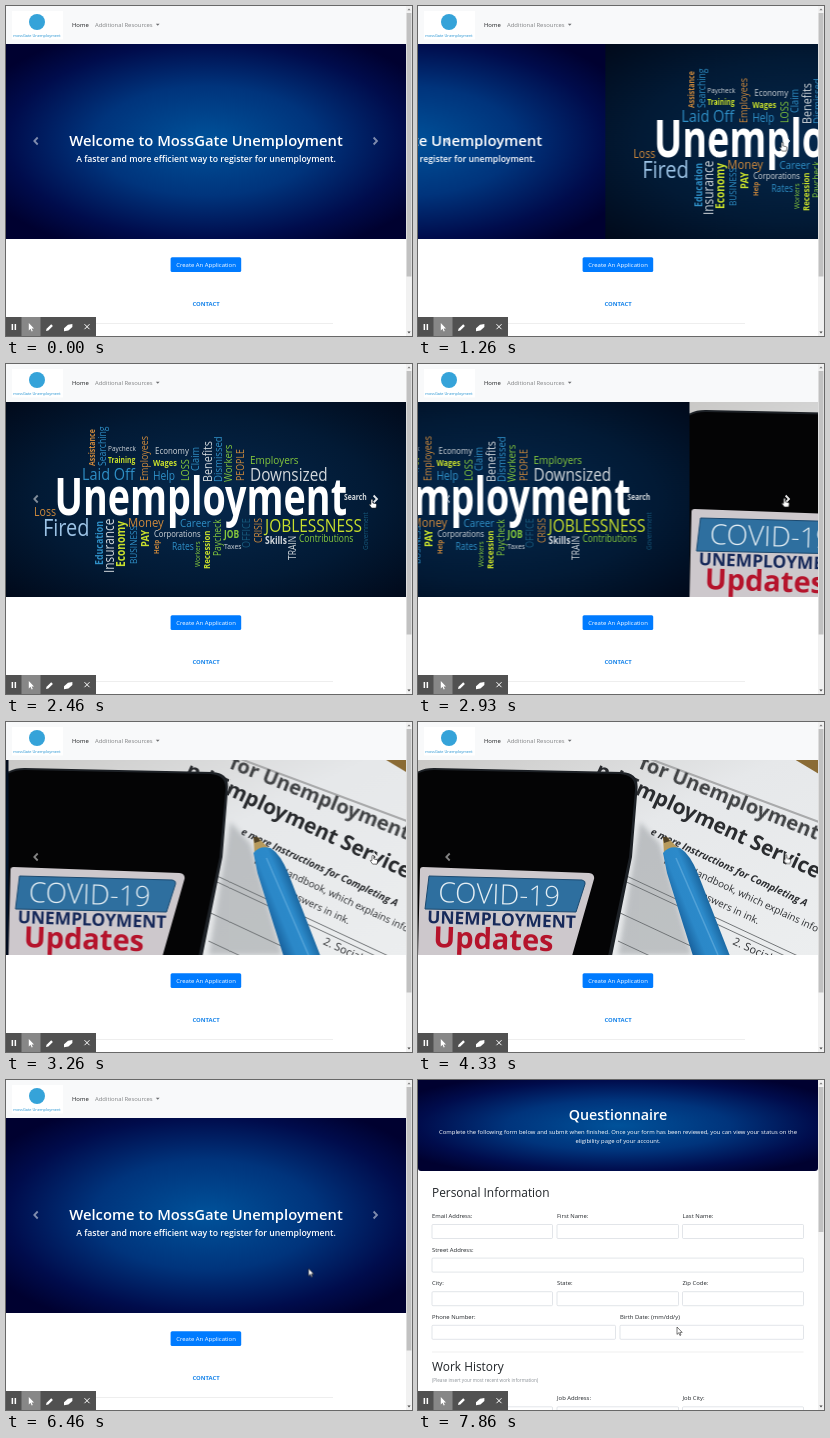
Write an HTML page that moves like this. It is 406 px wide and 330 px high and loops after 7930 ms.

```html
<!DOCTYPE html>
<html lang="en">
<head>
<meta charset="utf-8">
<title>Unemployment registration</title>
<style>
  html, body { margin: 0; width: 100%; height: 100%; overflow: hidden; background: #fff; }
  svg { display: block; }
  text { font-family: "Open Sans", "Noto Sans", sans-serif; white-space: pre; }
</style>
</head>
<body>
<svg id="stage" width="406" height="330" viewBox="0 0 406 330"></svg>
<script>
const LOOP = 7930;
const CONDENSED = 0.85;

const text = (x, y, size, str, fill = '#212529', extra = '') =>
  `<text x="${x}" y="${y}" font-size="${size}" fill="${fill}" ${extra}>${str}</text>`;
const turned = (x, y, angle, size, str, fill, extra = '') =>
  `<text transform="translate(${x} ${y}) rotate(${angle})" font-size="${size}" fill="${fill}" ${extra}>${str}</text>`;
const rect = (x, y, w, h, fill, extra = '') =>
  `<rect x="${x}" y="${y}" width="${w}" height="${h}" fill="${fill}" ${extra}/>`;
const path = (d, fill, extra = '') => `<path d="${d}" fill="${fill}" ${extra}/>`;
const MID = 'text-anchor="middle"';
const SEMI = 'font-weight="600"';
const BOLD = 'font-weight="700"';

const defs = `<defs>
  <radialGradient id="blue" r=".62">
    <stop offset="0" stop-color="#00529a"/><stop offset=".45" stop-color="#00347c"/>
    <stop offset=".8" stop-color="#000c4c"/><stop offset="1" stop-color="#000130"/>
  </radialGradient>
  <radialGradient id="night" r=".7">
    <stop offset="0" stop-color="#06294d"/><stop offset=".6" stop-color="#021a35"/>
    <stop offset="1" stop-color="#010a1b"/>
  </radialGradient>
  <linearGradient id="paper" x2="1" y2="1">
    <stop offset="0" stop-color="#c9c8c6"/><stop offset=".45" stop-color="#e6e8ea"/>
    <stop offset="1" stop-color="#eceeef"/>
  </linearGradient>
  <linearGradient id="pen" gradientUnits="userSpaceOnUse" x1="257" y1="190" x2="296" y2="174">
    <stop offset="0" stop-color="#17609c"/><stop offset=".3" stop-color="#2b88c8"/>
    <stop offset=".6" stop-color="#2c8aca"/><stop offset="1" stop-color="#0f4f84"/>
  </linearGradient>
  <filter id="soft"><feGaussianBlur stdDeviation="2.5"/></filter>
  <filter id="hazy"><feGaussianBlur stdDeviation=".6"/></filter>
</defs>`;

// Slides, each drawn in stage coordinates
const welcome = rect(0, 37, 400.5, 196, 'url(#blue)') +
  text(200, 140, 14.8, 'Welcome to MossGate Unemployment', '#fff', MID + SEMI) +
  text(200, 156, 8.7, 'A faster and more efficient way to register for unemployment.', '#fff', MID + SEMI);

const INK = {
  w: '#d3d8dc', b: '#2f8fc6', o: '#cf8a3c', y: '#c9e02c', g: '#86c93c', s: '#9cc3e6', d: '#17597c'
};
// text, x, baseline, size, ink; a capital ink letter means bold
const across = [
  ['Paycheck', 102, 87, 7.6, 'w'], ['Training', 102, 99, 7.9, 'Y'], ['Laid Off', 76, 116, 17, 'b'],
  ['Wages', 147, 102, 8.8, 'Y'], ['Economy', 149, 89.5, 9.3, 'w'], ['Help', 147, 116, 12, 'b'],
  ['Employers', 244, 100, 11.7, 'g'], ['Downsized', 244, 117, 18, 'w'], ['Search', 338, 136, 8, 'W'],
  ['Loss', 28, 152, 12.5, 'o'], ['Fired', 37, 172, 23.5, 's'], ['Money', 122, 163, 13.3, 'o'],
  ['Career', 174, 163, 11.7, 'b'], ['Corporations', 148, 173, 9, 'w'], ['Rates', 166, 186, 10, 'b'],
  ['JOB', 218, 174, 9.9, 'G'], ['Taxes', 218, 185, 8, 'w'], ['JOBLESSNESS', 259, 168, 18.2, 'y'],
  ['Skills', 259, 180, 10, 'W'], ['Contributions', 293, 178, 10, 'g']
];
const upward = [
  ['Assistance', 89, 102, 8.2, 'O'], ['Searching', 100, 102, 10.2, 'b'], ['Employees', 142, 117, 10.5, 'o'],
  ['LOSS', 183, 117, 10.8, 'g'], ['Claim', 193, 107, 10.8, 'b'], ['Benefits', 206, 118, 12.7, 'w'],
  ['Dismissed', 216, 118, 11.3, 'b'], ['Workers', 226, 118, 11.4, 'g'], ['PEOPLE', 238, 117, 10.4, 'o'],
  ['Education', 97, 201, 10.4, 'B'], ['Insurance', 108, 209, 14, 'w'], ['Economy', 119, 203, 12, 'Y'],
  ['BUSINESS', 131, 200, 9.7, 'b'], ['PAY', 143, 183, 11, 'Y'], ['Help', 153, 190, 7.2, 'O'],
  ['Workers', 194, 203, 7.8, 'g'], ['Recession', 204, 205, 9.2, 'Y'], ['Paycheck', 215, 192, 10, 'g'],
  ['OFFICE', 244, 184, 10.7, 'd'], ['CRISIS', 256, 179, 10.1, 'o'], ['TRAIN', 290, 196, 10, 'w'],
  ['Government', 362, 186, 7.6, 'd']
];
const word = angle => ([str, x, y, size, ink]) => {
  const key = ink.toLowerCase();
  return `<text transform="translate(${x} ${y}) rotate(${angle}) scale(${CONDENSED} 1)" font-size="${size}"
    fill="${INK[key]}" font-weight="${ink === key ? 400 : 700}">${str}</text>`;
};
const cloud = rect(0, 37, 400.5, 196, 'url(#night)') +
  across.map(word(0)).join('') + upward.map(word(-90)).join('') +
  `<text transform="translate(48.5 150.5) scale(.72 1)" font-size="52.4" fill="#fff" ${BOLD}>Unemployment</text>`;

const TILT = 25;
const form = [
  ['e more Instructions for Completing A', 232, 112, 'font-style="italic" font-weight="700"'],
  ['page. Handbook, which explains info', 246, 139, ''],
  ['Write answers in ink.', 253, 162, '']
].map(([str, x, y, extra]) => turned(x, y, TILT, 9.9, str, '#2b2d30', extra)).join('');
const rules = [150, 156, 190, 219].map(y =>
  path(`M200 ${y}L410 ${y + 98}`, 'none', 'stroke="#55585b" stroke-width=".8"')).join('');

const photo = rect(0, 37, 400.5, 196, 'url(#paper)') +
  path('M376 37H401V52Z', '#8a6b35', 'filter="url(#hazy)"') +
  path('M232 37L401 100', 'none', 'stroke="#a9aaab" stroke-width="2" filter="url(#hazy)"') +
  turned(220, 46, 22, 20.3, 'for Unemployment', '#404244', BOLD + ' filter="url(#hazy)"') +
  turned(176, 53, TILT, 21, 'nd Employment Service', '#2a2c2f', BOLD) +
  rules + form +
  turned(314, 222, TILT, 11, '2. Social Security', '#2b2d30') +
  path('M222 100L242 122L274 233H200Z', '#6d7277', 'opacity=".35" filter="url(#soft)"') +
  // phone
  path('M-1 50Q6 46 16 46L204 50Q221 51 219.5 67L214 135L194 234H-1Z', '#1d2126') +
  path('M-1 52Q6 48 16 48L202 52Q218 53 217 68L211 135L190 234H-1Z', '#040405') +
  path('M5 145L171 151Q177 152 176 157L154 234H0L2 148Q2 145 5 145Z', '#cdc8cc') +
  path('M11 154L164 158Q168 159 167 162L158 190L7 187Z', '#2e6f9f', 'stroke="#1c4a70"') +
  turned(20, 180, 2, 28, 'COVID-19', '#e3edf3', 'font-weight="300"') +
  turned(9, 201, 2, 17.4, 'UNEMPLOYMENT', '#16295a', BOLD) +
  turned(15, 225, 2, 29, 'Updates', '#b5142c', BOLD) +
  // pen
  path('M245 115L249 115L261 127L246 133Z', '#b79a5c') +
  path('M245 115L249 115L252 119L246 121Z', '#4f4126') +
  path('M245 131Q251 123 262 126Q272 132 280 152L312 234H275L249 151Z', 'url(#pen)') +
  path('M258 136L300 233', 'none', 'stroke="#7dbde6" stroke-width="1.6" opacity=".45"');

const slides = [welcome, cloud, photo, welcome]
  .map((s, i) => `<svg x="${i * 400}" y="37" width="400.5" height="196" viewBox="0 37 400.5 196">${s}</svg>`).join('');

const chevron = (id, x, dir) =>
  path(`M${x - 1.7 * dir} 131.5l${3.4 * dir} 3.5l${-3.4 * dir} 3.5`, 'none',
    `id="${id}" stroke="#fff" stroke-width="1.8" opacity=".5"`);

const scrollbar = thumb => rect(400, 0, 6, 330, '#f1f1f1') + rect(400.6, 7, 4.8, thumb, '#c1c1c1') +
  path('M401.4 4.2L403 2.4L404.6 4.2Z', '#777') + path('M401.4 325.6L403 327.4L404.6 325.6Z', '#444');

const home = rect(0, 0, 406, 330, '#fff') + rect(0, 0, 400, 38, '#f8f9fa') +
  rect(6, 5, 51, 28.5, '#fff') + '<circle cx="31" cy="16" r="8" fill="#35a3d9"/>' +
  text(31, 30.5, 3.9, 'mossGate Unemployment', '#1d8fd0', MID) +
  text(66, 21, 5.9, 'Home', '#1b1d1f') + text(89, 21, 5.9, 'Additional Resources', '#808284') +
  path('M149.8 17.8h3.8l-1.9 2z', '#6c6e70') +
  `<svg x="0" y="38" width="400" height="195" viewBox="0 38 400 195"><g id="strip">${slides}</g></svg>` +
  chevron('prev', 30, -1) + chevron('next', 369.3, 1) +
  rect(164.6, 251.2, 70.6, 14.8, '#007bff', 'rx="1.6" id="button"') +
  text(200, 260.8, 5.95, 'Create An Application', '#fff', MID) +
  text(200, 300.3, 5.9, 'CONTACT', '#1583ea', MID + BOLD) +
  rect(73, 317.2, 254, .6, '#e3e3e3') + scrollbar(263.5);

// Questionnaire: label, x, label baseline, box width
const fields = [
  ['Email Address:', 14, 138, 120.5], ['First Name:', 139, 138, 121.5], ['Last Name:', 264.5, 138, 121],
  ['Street Address:', 14, 171.6, 371.5],
  ['City:', 14, 205.2, 120.5], ['State:', 139, 205.2, 121.5], ['Zip Code:', 264.5, 205.2, 121],
  ['Phone Number:', 14, 238.8, 183.5], ['Birth Date: (mm/dd/y)', 202, 238.8, 183.5],
  ['Job Title:', 14, 320.3, 120.5], ['Job Address:', 139, 320.3, 121.5], ['Job City:', 264.5, 320.3, 121]
].map(([label, x, y, w]) => text(x, y, 5.9, label) +
  rect(x, y + 6.5, w, 14, '#fff', 'rx="1" stroke="#ced4da" stroke-width=".6"')).join('');

const questionnaire = rect(0, 0, 406, 330, '#fff') +
  path('M0 0H400V88Q400 91 397 91H3Q0 91 0 88Z', 'url(#blue)') +
  text(200, 40, 14.3, 'Questionnaire', '#fff', MID + SEMI) +
  text(200, 53.6, 5.9, 'Complete the following form below and submit when finished. Once your form has been reviewed, you can view your status on the', '#fff', MID) +
  text(200, 63.2, 5.9, 'eligibility page of your account.', '#fff', MID) +
  text(14, 117, 11.9, 'Personal Information', '#212529', 'font-weight="500"') +
  fields + rect(14, 271.7, 371.5, .6, '#e3e3e3') +
  text(14, 291, 11.9, 'Work History', '#212529', 'font-weight="500"') +
  text(14, 302, 4.6, '(Please insert your most recent work information)', '#8a9096') + scrollbar(145);

const ARROW = 'M0 0V7.4L1.7 5.8L2.9 8.5L4 8L2.8 5.4H5.2Z';
const HAND = 'M-1 1.2a.9.9 0 0 1 1.8 0V4l3 .7q1 .3.8 1.4l-.6 3H-.3L-2.8 5.7q.7-1.2 1.8-.1z';
const OUTLINE = 'stroke="#222" stroke-width=".6"';

const toolbar = rect(0, 311, 90, 19, '#515151') + rect(15.5, 311, 19, 19, '#878787') +
  rect(5.6, 318, 1.5, 6, '#fff') + rect(8.6, 318, 1.5, 6, '#fff') +
  path(ARROW, '#fff', 'transform="translate(22.8 317)"') +
  path('M40 325l.6-2.2l4.6-4.6l1.7 1.7l-4.6 4.6z', '#fff') +
  path('M58 322.2l4-3.4l4.4-.8v3l-4 3.6l-4.4.6z', '#fff') +
  path('M78.5 318.2l5 5m0-5l-5 5', 'none', 'stroke="#fff" stroke-width="1"');

document.getElementById('stage').innerHTML = defs + home +
  `<g id="form" opacity="0">${questionnaire}</g>` + toolbar +
  `<g id="cursor">${path(HAND, '#fff', OUTLINE + ' id="hand"')}${path(ARROW, '#fff', OUTLINE + ' id="arrow"')}</g>`;

// steps: [time in ms, value, easing towards the next step]
const play = (id, prop, steps) => document.getElementById(id).animate(
  steps.map(([t, value, easing = 'linear']) => ({ offset: t / LOOP, [prop]: value, easing })),
  { duration: LOOP, iterations: Infinity });
const hold = (id, prop, steps) =>
  play(id, prop, [...steps, [LOOP, steps[steps.length - 1][1]]].map(([t, v]) => [t, v, 'step-end']));
const at = (x, y = 0) => `translate(${x}px, ${y}px)`;
const EASE = 'ease-in-out';

play('strip', 'transform', [
  [0, at(0)], [950, at(0), EASE], [1550, at(-400)], [2695, at(-400), EASE],
  [3295, at(-800)], [5102, at(-800), EASE], [5702, at(-1200)], [LOOP, at(-1200)]
]);
play('cursor', 'transform', [
  [0, at(420, 150)], [330, at(420, 150), EASE], [880, at(364, 136)], [2000, at(365, 136)],
  [2460, at(366, 135)], [3260, at(367, 133)], [5100, at(369, 132)], [5800, at(369, 132), EASE],
  [7200, at(222, 257)], [7600, at(222, 257), EASE], [7860, at(259, 247)], [LOOP, at(259, 247)]
]);
hold('hand', 'opacity', [[0, 0], [500, 1], [6150, 0], [7000, 1], [7600, 0]]);
hold('arrow', 'opacity', [[0, 1], [500, 0], [6150, 1], [7000, 0], [7600, 1]]);
hold('next', 'opacity', [[0, .5], [600, .9], [6150, .5]]);
hold('button', 'fill', [[0, '#007bff'], [7000, '#0069d9']]);
hold('form', 'opacity', [[0, 0], [7600, 1]]);
</script>
</body>
</html>
```
